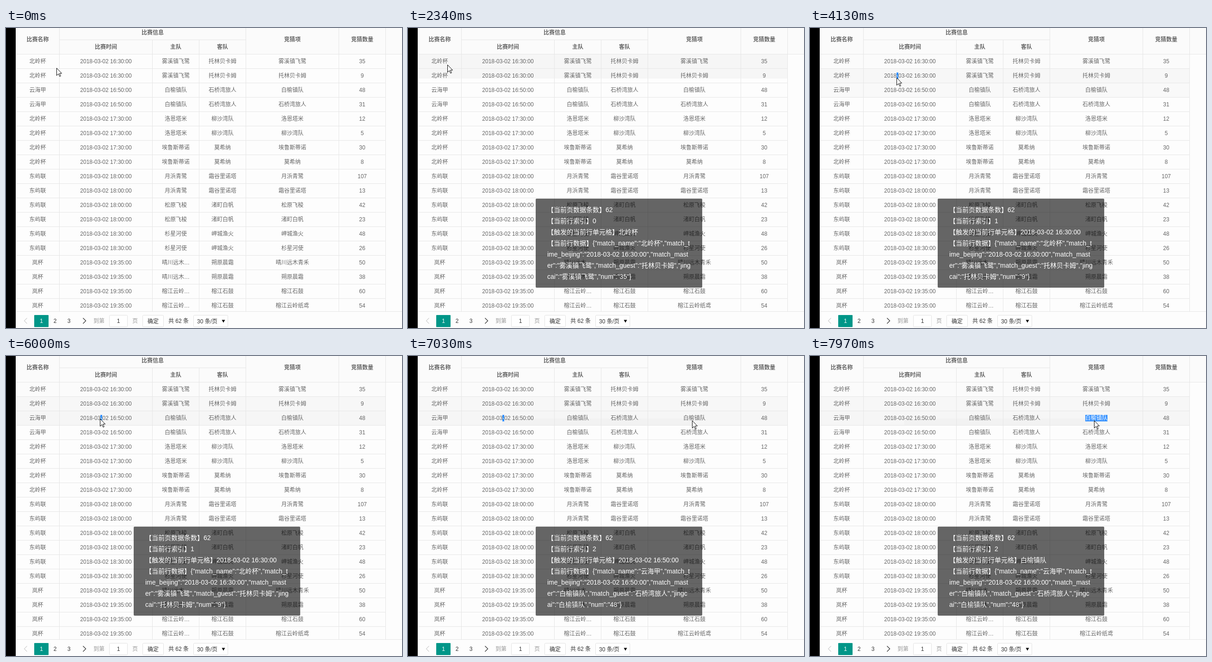
These frames come from a looping animation (856 px wide and 647 px high, 8000 ms). An HTML page:

```html
<!DOCTYPE html>
<html lang="zh">
<head>
<meta charset="utf-8">
<title>Table</title>
<style>
html, body { margin: 0; width: 100%; height: 100%; overflow: hidden; background: #fdfdfd; }
svg { display: block; width: 100%; height: 100%; }
text { font: 12px "Liberation Sans", "Noto Sans CJK SC", "Noto Sans CJK", sans-serif; fill: #666; white-space: pre; }
.bold { font-weight: 700; }
.dark { fill: #333; }
.pale { fill: #999; }
.white { fill: #fff; }
.msg { font-size: 14px; fill: #fff; }
</style>
</head>
<body>
<svg id="stage" viewBox="0 0 856 647"></svg>
<script>
const LOOP = 8000, TOP = 57, ROW = 31, LINE = '#e6e6e6', DAY = '2018-03-02 ';
const COLS = [68.5, 216, 367, 468, 619, 770];
const stage = document.getElementById('stage');

function add(tag, attrs, parent = stage) {
  const el = document.createElementNS('http://www.w3.org/2000/svg', tag);
  for (const k in attrs) el.setAttribute(k, attrs[k]);
  parent.appendChild(el);
  return el;
}
const rect = (x, y, width, height, fill, more, parent) =>
  add('rect', { x, y, width, height, fill, ...more }, parent);
function label(str, x, y, cls = '', anchor = 'middle', parent = stage) {
  add('text', { x, y, class: cls, 'text-anchor': anchor }, parent).textContent = str;
}
const box = (x, w) =>
  rect(x + .5, 619.5, w - 1, 25, '#fff', { stroke: '#e2e2e2', rx: 2 });

// league, time, home, guest, first count, second count, guest listed first
const matches = [
  ['北岭杯', '16:30', '雾溪镇飞鹭', '托林贝卡姆', 35, 9],
  ['云海甲', '16:50', '白榆镇队', '石桥湾旅人', 48, 31],
  ['北岭杯', '17:30', '洛恩塔米', '柳沙湾队', 12, 5],
  ['北岭杯', '17:30', '埃鲁斯蒂诺', '莫希纳', 30, 8],
  ['东屿联', '18:00', '月浜青鹭', '霜谷里诺塔', 107, 13],
  ['东屿联', '18:00', '松原飞梭', '渚町白帆', 42, 23],
  ['东屿联', '18:30', '杉星河使', '岬城渔火', 48, 26, true],
  ['岚杯', '19:35', '晴川远木青禾', '朔原晨霜', 50, 38],
  ['岚杯', '19:35', '榕江云岭纸鸢', '榕江石鼓', 60, 54, true]
];
const rows = matches.flatMap(([league, time, home, guest, n1, n2, swap]) => {
  const picks = swap ? [guest, home] : [home, guest];
  return [n1, n2].map((n, i) => [league, `${DAY}${time}:00`, home, guest, picks[i], n]);
});

// things that are simply on or off during a span of time
const timed = [];
const during = (from, to, el) => timed.push({ from, to, el });
const tint = (from, to, y, h, fill, x = 22, right = 820) =>
  during(from, to, rect(x, y, right - x, h, fill));

rect(0, 0, 856, 647, '#fdfdfd');
rect(22, 0, 834, 56, '#fbfbfb');
tint(290, 2460, 57, 52, '#f6f6f6');
tint(2460, LOOP, 57, 30, '#fbfbfb');
tint(2460, LOOP, 88, 30, '#f7f7f7');
tint(2610, 5240, 119, 30, '#f9f9f9');
tint(5240, LOOP, 119, 30, '#f6f6f6');
tint(6730, LOOP, 135, 15, '#f2f2f2', 204, 614);

// grid
for (const x of [115, 518, 719, 820]) rect(x, 0, 1, 611, LINE);
for (const x of [316, 417]) rect(x, 25, 1, 586, LINE);
rect(115, 25, 403, 1, LINE);
rect(22, 56, 834, 1, LINE);
for (let i = 1; i < 18; i++) rect(22, 56 + i * ROW, 799, 1, LINE);

// header and body
[['比赛名称', 68.5, 29], ['比赛信息', 317, 14], ['竞猜项', 619, 29], ['竞猜数量', 770, 29],
 ['比赛时间', 216, 45], ['主队', 367, 45], ['客队', 468, 45]]
  .forEach(([s, x, y]) => label(s, x, y, 'bold'));
rows.forEach((row, r) => row.forEach((cell, c) => {
  const str = c === 2 && cell.length > 5 ? cell.slice(0, 4) + '…' : cell;
  label(str, COLS[c], TOP + 19 + r * ROW);
}));

// text selections
function select(from, to, r, x, w, str) {
  const g = add('g'), y = TOP + r * ROW;
  rect(x, y + 8, w, 14, '#3390ff', {}, g);
  label(str, x + w / 2, y + 19, 'white', 'middle', g);
  during(from, to, g);
}
select(3710, 5880, 1, 187, 4, '-');
select(6000, 7430, 2, 204, 4, '-');
select(7550, LOOP, 2, 595, 48, rows[2][4]);

// pager
rect(22, 611, 834, 36, '#fdfdfd');
rect(22, 611, 834, 1, LINE);
const chevron = (d, stroke) =>
  add('path', { d, stroke, fill: 'none', 'stroke-width': 1.3 });
chevron('M45.5 625.5L39.5 631.5L45.5 637.5', '#d2d2d2');
chevron('M166.5 625.5L172.5 631.5L166.5 637.5', '#333');
rect(61, 619, 31, 26, '#009688', { rx: 1 });
label('1', 76.5, 636, 'white');
label('2', 106, 636, 'dark');
label('3', 136, 636, 'dark');
label('到第', 189, 636, 'pale', 'start');
box(223, 40);
label('1', 243, 636, 'dark');
label('页', 273, 636, 'pale', 'start');
box(295, 46);
label('确定', 318, 637, 'dark');
label('共 62 条', 351, 636, 'dark', 'start');
box(405, 75);
label('30 条/页', 413, 637, 'dark', 'start');
add('path', { d: 'M466.5 629.5h7l-3.5 6z', fill: '#000' });
rect(0, 0, 21, 647, '#000');

// messages
function popup(open, close, index, col) {
  const [league, time, home, guest, pick, num] = rows[index];
  const [head, tail] = home.length > 4 ? ['jing', 'cai'] : ['jingc', 'ai'];
  const el = add('g');
  rect(-180, -96, 360, 192, '#000', { rx: 2, 'fill-opacity': .6 }, el);
  [
    '【当前页数据条数】62',
    `【当前行索引】${index}`,
    `【触发的当前行单元格】${rows[index][col]}`,
    `【当前行数据】{"match_name":"${league}","match_t`,
    `ime_beijing":"${time}","match_mast`,
    `er":"${home}","match_guest":"${guest}","${head}`,
    `${tail}":"${pick}","num":"${num}"}`
  ].forEach((s, i) => label(s, -155, -67 + i * 24, 'msg', 'start', el));
  return { open, close, el };
}
const popups = [
  popup(1257, 3777, 0, 0),
  popup(3777, 6030, 1, 1),
  popup(6030, 7665, 2, 1),
  popup(7665, LOOP * 2, 2, 4)
];
const ticks = [0, 1350, 1480, 1630, 3860, 4010, 4130, 6150, 6300, 6420, 7700, 7830, 7970];

const cursor = add('path', {
  d: 'M.5 .5V16.5L4.3 12.9 7 18.6 9.2 17.6 6.7 11.9H11.5z',
  fill: '#fff', stroke: '#000', 'stroke-width': 1
});
const moves = [
  [0, 109, 86], [140, 92, 82], [290, 84, 78], [2340, 85, 79], [2460, 95, 101],
  [2610, 118, 115], [2730, 150, 121], [2850, 178, 114], [2970, 187, 107],
  [5090, 194, 119], [5240, 199, 126], [5360, 202, 132], [5480, 203, 135],
  [6730, 551, 134], [6880, 618, 140], [7030, 614, 139]
];

const last = (list, test) => list.filter(test).pop();
const clamp = v => Math.min(1, Math.max(0, v));

// the CSS "ease" curve
function ease(x) {
  if (x <= 0 || x >= 1) return clamp(x);
  const curve = (s, a, b) => 3 * s * (1 - s) * (1 - s) * a + 3 * s * s * (1 - s) * b + s * s * s;
  let lo = 0, hi = 1;
  for (let i = 0; i < 24; i++) {
    const mid = (lo + hi) / 2;
    if (curve(mid, .25, .25) < x) lo = mid; else hi = mid;
  }
  return curve(lo, .1, 1);
}

function drawPopup({ open, close, el }, t) {
  let scale, opacity;
  if (t < close) {
    const p = ease((t - open) / 300);
    scale = .5 + .5 * p;
    opacity = p;
  } else {
    const p = clamp((t - close) / 200);
    scale = p < .3 ? 1 + .05 * ease(p / .3) : 1.05 - .35 * ease((p - .3) / .7);
    opacity = 1 - ease(p);
  }
  el.setAttribute('display', opacity > 0 ? 'inline' : 'none');
  el.setAttribute('opacity', opacity);
  el.setAttribute('transform', `translate(456 464) scale(${scale})`);
}

function draw(t) {
  for (const { from, to, el } of timed)
    el.setAttribute('display', t >= from && t < to ? 'inline' : 'none');
  const tick = last(ticks, k => k <= t);
  popups.forEach(p => drawPopup(p, tick));
  const [, x, y] = last(moves, m => m[0] <= t);
  cursor.setAttribute('transform', `translate(${x} ${y})`);
}

const start = performance.now();
function frame() {
  draw((performance.now() - start) % LOOP);
  requestAnimationFrame(frame);
}
frame();
</script>
</body>
</html>
```
